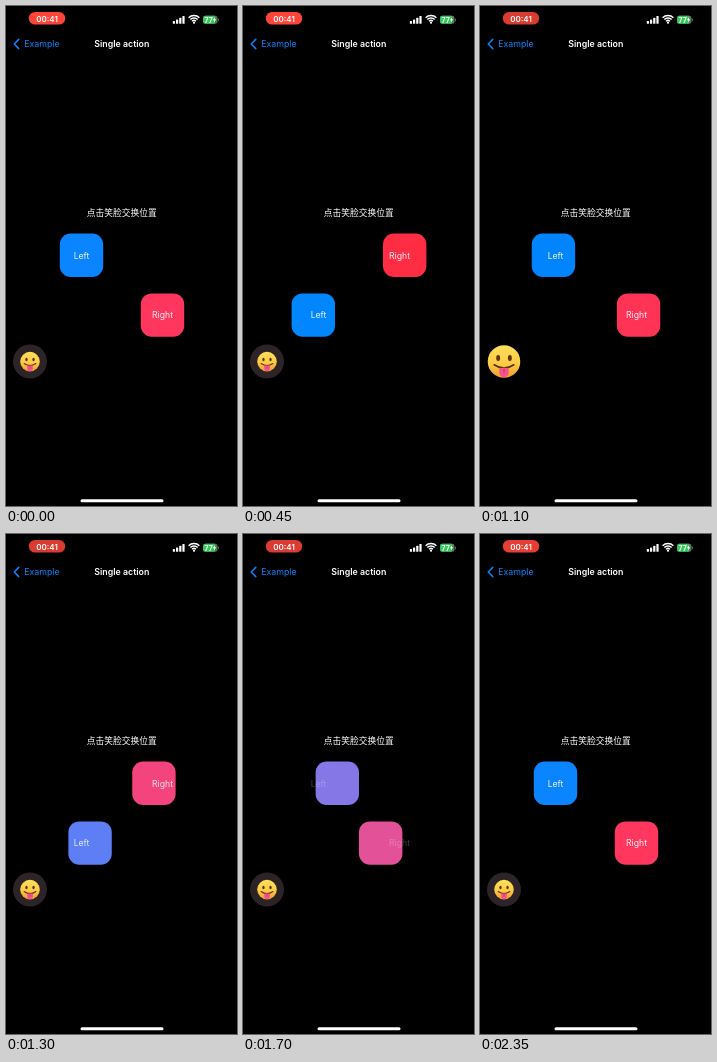
Recreate the animation shown at these times as an HTML page with a canvas. Size 231x500 px, loop 2400 ms.

```html
<!DOCTYPE html>
<html lang="en">
<head>
<meta charset="utf-8">
<title>Single action</title>
<style>
  html, body { margin: 0; width: 100%; height: 100%; overflow: hidden; background: #000; }
  canvas { display: block; width: 231px; height: 500px; }
</style>
</head>
<body>
<canvas id="stage"></canvas>
<script>
const LOOP = 2400;
const BLUE = [10, 132, 255];
const PINK = [255, 55, 95];
const SANS = 'Inter, Roboto, sans-serif';
const CJK = '"Noto Sans CJK SC", "Noto Sans CJK", sans-serif';
const SWAPS = [205, 660, 1125, 1553];
const PRESSES = [[60, 175], [500, 630], [950, 1095], [1390, 1523]];

const canvas = document.getElementById('stage');
const ctx = canvas.getContext('2d');
const ratio = window.devicePixelRatio || 1;
canvas.width = 231 * ratio;
canvas.height = 500 * ratio;
ctx.scale(ratio, ratio);

const clamp = (v, lo = 0, hi = 1) => Math.min(hi, Math.max(lo, v));
const smooth = v => { v = clamp(v); return v * v * (3 - 2 * v); };
const rgb = c => `rgb(${c.map(Math.round).join(',')})`;

// Step response of an underdamped spring.
function spring(ms, response = 0.48, damping = 0.6) {
  if (ms <= 0) return 0;
  const t = ms / 1000;
  const omega = 2 * Math.PI / response;
  const root = Math.sqrt(1 - damping * damping);
  const angle = omega * root * t;
  return 1 - Math.exp(-damping * omega * t) *
    (Math.cos(angle) + damping / root * Math.sin(angle));
}

// Springs are linear, so interrupted swaps simply add up.
const swapAmount = t =>
  SWAPS.reduce((sum, start, i) => sum + (i % 2 ? -1 : 1) * spring(t - start), 0);

function pressAmount(t) {
  let amount = 0;
  for (const [down, up] of PRESSES) {
    if (t < down) continue;
    amount = t < up
      ? 0.9 * smooth((t - down) / 80) + 0.1 * clamp((t - down) / (up - down))
      : Math.exp(-Math.pow((t - up) / 70, 2));
  }
  return amount;
}

function mixLinear(a, b, p) {
  const decode = v => {
    v /= 255;
    return v <= 0.04045 ? v / 12.92 : Math.pow((v + 0.055) / 1.055, 2.4);
  };
  const encode = v => 255 * (v <= 0.0031308 ? 12.92 * v : 1.055 * Math.pow(v, 1 / 2.4) - 0.055);
  return a.map((v, i) => encode(clamp(decode(v) + (decode(b[i]) - decode(v)) * p)));
}

function text(str, x, y, size, color = '#fff', weight = 400, align = 'center', family = SANS) {
  ctx.font = `${weight} ${size}px ${family}`;
  ctx.fillStyle = color;
  ctx.textAlign = align;
  ctx.textBaseline = 'alphabetic';
  ctx.fillText(str, x, y);
}

function box(x, y, w, h, r, fill) {
  ctx.beginPath();
  ctx.roundRect(x, y, w, h, r);
  ctx.fillStyle = fill;
  ctx.fill();
}

function ellipse(x, y, rx, ry, fill) {
  ctx.beginPath();
  ctx.ellipse(x, y, rx, ry, 0, 0, 2 * Math.PI);
  ctx.fillStyle = fill;
  ctx.fill();
}

function line(points, color, width) {
  ctx.beginPath();
  points.forEach(([x, y]) => ctx.lineTo(x, y));
  ctx.strokeStyle = color;
  ctx.lineWidth = width;
  ctx.lineCap = ctx.lineJoin = 'round';
  ctx.stroke();
}

function statusBar(t) {
  const dim = 1 - 0.15 * smooth((t - 450) / 600) + 0.05 * smooth((t - 1600) / 500);
  box(22.8, 6, 36.4, 12.6, 6.3, rgb([255 * dim, 69 * dim, 58 * dim]));
  text('00:41', 41, 15.5, 8, '#fff', 600);

  for (let i = 0; i < 4; i++) {
    const h = 2.7 + i * 1.7;
    box(166.8 + i * 3.2, 17.8 - h, 2.2, h, 0.6, '#fff');
  }

  for (const r of [2.8, 5.2, 7.6]) {
    ctx.beginPath();
    ctx.arc(188, 17.2, r, -Math.PI * 0.75, -Math.PI * 0.25);
    ctx.strokeStyle = '#fff';
    ctx.lineWidth = 1.5;
    ctx.lineCap = 'butt';
    ctx.stroke();
  }
  ellipse(188, 16.7, 1.1, 1.1, '#fff');

  box(197, 9.8, 14.5, 8, 2.4, '#56795e');
  box(197, 9.8, 11.8, 8, [2.4, 0, 0, 2.4], '#34c759');
  box(212.1, 12.4, 0.9, 2.8, 0.4, '#56795e');
  text('77', 202.7, 16.5, 7, '#fff', 700);
  ctx.beginPath();
  [[209.2, 11], [206.9, 14.2], [208.4, 14.2], [207.8, 16.8], [210.3, 13.3], [208.8, 13.3]]
    .forEach(([x, y]) => ctx.lineTo(x, y));
  ctx.fillStyle = '#fff';
  ctx.fill();
}

function navigation() {
  line([[12.8, 33.4], [8.2, 38], [12.8, 42.6]], rgb(BLUE), 1.5);
  text('Example', 18.2, 41.3, 8.8, rgb(BLUE), 400, 'left');
  text('Single action', 115.8, 41.2, 8.8, '#fff', 600);
}

function swapCards(p) {
  const size = 43.4;
  const left = 53.8;
  const travel = 81;
  const labelAlpha = smooth((Math.abs(2 * p - 1) - 0.35) / 0.55);
  [[227.6, p], [287.4, 1 - p]].forEach(([y, amount]) => {
    box(left + travel * amount, y, size, size, 11, rgb(mixLinear(BLUE, PINK, amount)));
    const side = amount > 0.5 ? 1 : 0;
    text(['Left', 'Right'][side], 75.5 + travel * side, y + 25, 8.7,
      `rgba(255,255,255,${0.92 * labelAlpha})`);
  });
}

// Face drawn around the centre at unit radius.
function face(radius, squint) {
  ctx.save();
  ctx.translate(24, 355.6);
  ctx.scale(radius, radius);
  const skin = ctx.createLinearGradient(0, -1, 0, 1);
  skin.addColorStop(0, '#ffe05a');
  skin.addColorStop(0.55, '#fdcc43');
  skin.addColorStop(1, '#ee9c2c');
  ellipse(0, 0, 1, 1, skin);

  const brown = '#5b3212';
  for (const s of [-1, 1]) {
    if (squint) line([[s * 0.62, -0.46], [s * 0.23, -0.22], [s * 0.65, -0.06]], brown, 0.11);
    else ellipse(s * 0.36, -0.22, 0.12, 0.18, brown);
  }

  ctx.beginPath();
  if (squint) {
    ctx.moveTo(-0.6, 0.16);
    ctx.quadraticCurveTo(0, 0.26, 0.6, 0.16);
    ctx.bezierCurveTo(0.6, 0.92, -0.6, 0.92, -0.6, 0.16);
    ctx.fillStyle = brown;
    ctx.fill();
  } else {
    ctx.moveTo(-0.6, 0.2);
    ctx.quadraticCurveTo(0, 0.62, 0.6, 0.2);
    ctx.strokeStyle = brown;
    ctx.lineWidth = 0.11;
    ctx.lineCap = 'round';
    ctx.stroke();
  }
  box(-0.29, 0.4, 0.58, 0.56, [0.08, 0.08, 0.29, 0.29], '#f4538d');
  line([[0, 0.46], [0, 0.68]], '#c9326b', 0.06);
  ctx.restore();
}

function smileButton(t) {
  const amount = pressAmount(t);
  const pressed = PRESSES.some(([down, up]) => t >= down && t < up);
  ctx.globalAlpha = clamp(1 - 1.3 * amount);
  const r = 17 * (1 - 0.5 * amount);
  ellipse(24, 355.5, r, r, '#2c2427');
  ctx.globalAlpha = 1;
  face(9.8 + (pressed ? 5.4 : 6.5) * amount, pressed);
}

function draw(t) {
  ctx.fillStyle = '#000';
  ctx.fillRect(0, 0, 231, 500);
  statusBar(t);
  navigation();
  text('点击笑脸交换位置', 115.8, 209.8, 8.75, '#fff', 400, 'center', CJK);
  swapCards(swapAmount(t));
  smileButton(t);
  box(74.5, 493.2, 83, 3, 1.5, '#fff');
}

const start = performance.now();
function tick() {
  draw((performance.now() - start) % LOOP);
  requestAnimationFrame(tick);
}
tick();
</script>
</body>
</html>
```
